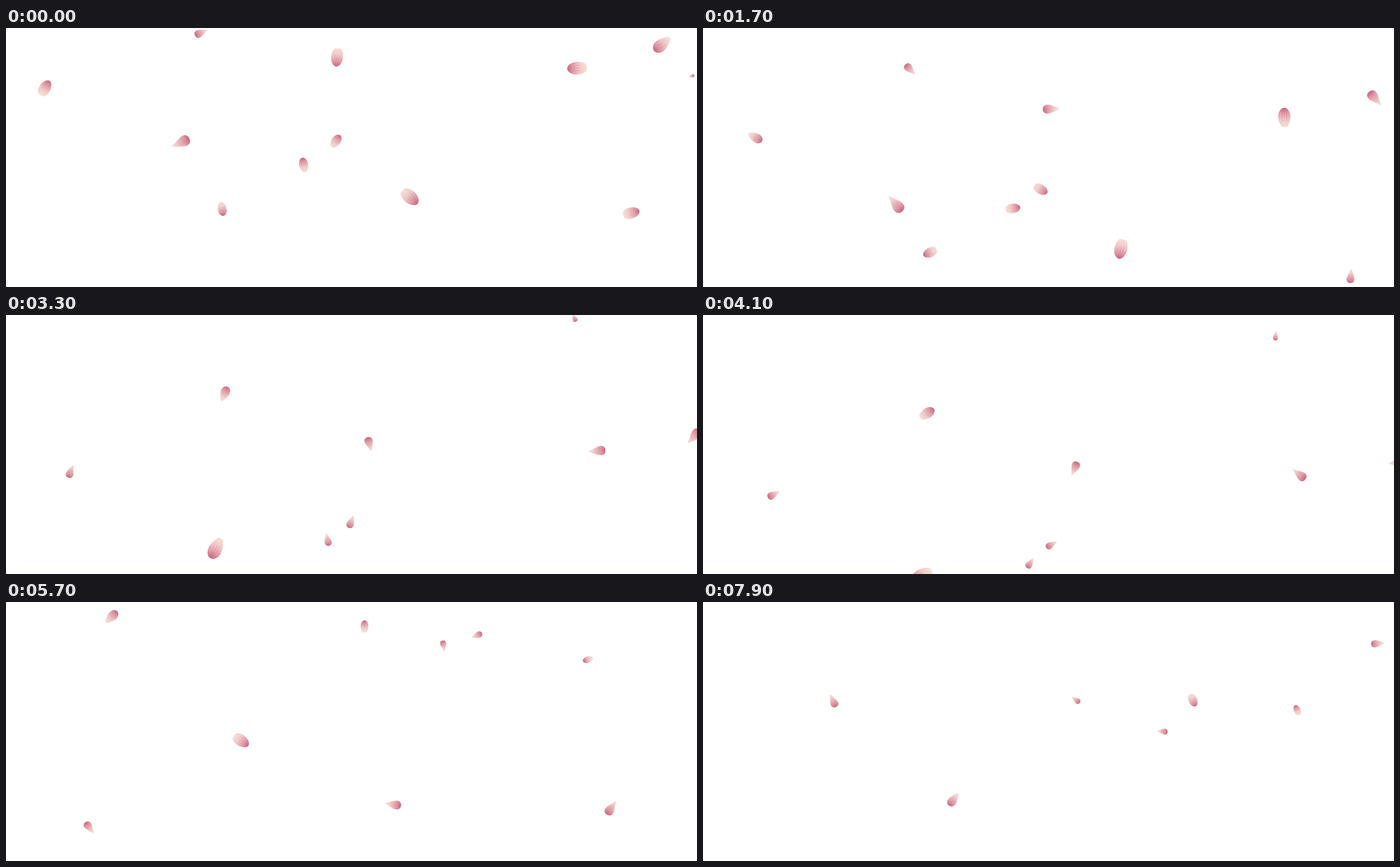
These frames come from a looping animation (1221 px wide and 458 px high, 8 s). An HTML page with a canvas:

```html
<!DOCTYPE html>
<html lang="en">
<head>
<meta charset="utf-8">
<title>Falling petals</title>
<style>
  html, body { margin: 0; width: 100%; height: 100%; overflow: hidden; background: #fff; }
  canvas { display: block; width: 1221px; height: 458px; }
</style>
</head>
<body>
<canvas id="stage" width="1221" height="458"></canvas>
<script>
const ctx = document.getElementById('stage').getContext('2d');
const LOOP = 8000, STEP = 100, RAD = Math.PI / 180;

// x, y, speed x, speed y, heading, spin, length, tilt phase, [fall acceleration]
const petals = [
  [69, 106, 13.8, 51.5, -57, 51, 30, -8],
  [345.5, 8, 12.3, 37.5, 155, 42, 31, -195, 0.72],
  [585, 52, 17.4, 53.7, 96, 48, 33, 25],
  [1009, 71, 10.7, 51.3, 177, 54, 36, -35],
  [1159, 29, 17, 56.5, 140, 52, 40, 70],
  [1211, 85, 8.5, 43, -10, 35, 13, 250],
  [308, 203, 19, 63.5, -25, 43, 43, 180],
  [583, 200, 8.1, 50.2, -55, 50, 27, -45],
  [526, 242, 12.8, 43.5, 260, 54, 27, -45, 1.05],
  [382, 320, 11.2, 45.3, 80, 44, 26, -45],
  [714, 299, 14.3, 54, 40, 37, 36, -25],
  [1105, 327, 23.3, 65.6, -15, 65, 30, 20],
  [971, -129, 10, 40.5, -63, 39, 19, -234],
  [75.5, -357.5, 19.5, 67.3, 30, 50, 31, -169],
  [568.5, -294, 11.4, 59.1, -61, 58, 22, -249],
  [674.5, -313, 17.3, 68.6, -14, 48, 24, -114],
  [744, -238.5, 15.4, 52.2, 110, 40, 24, -299],
  [1102, -259, 11.4, 42.1, 85, 57, 27, -282]
];

const blush = ctx.createLinearGradient(-0.5, 0, 0.5, 0);
[[0, '#f7dfd9'], [0.4, '#efc8c6'], [0.75, '#df97a4'], [1, '#c9687f']]
  .forEach(([at, color]) => blush.addColorStop(at, color));

// Unit petal with its dark base at +x; openness 0 is a teardrop, 1 a broad oval.
function drawPetal(open) {
  const tip = 0.2 * open;
  const wideX = 0.24 - 0.27 * open;
  const wideY = 0.27 + 0.06 * open;
  const shoulder = tip + 0.08 + 0.06 * open;
  const round = wideX + 0.17 + 0.1 * open;
  const base = 0.18 - 0.02 * open;

  ctx.beginPath();
  ctx.moveTo(-0.48, -tip);
  ctx.bezierCurveTo(-0.27, -shoulder, wideX - 0.18, -wideY, wideX, -wideY);
  ctx.bezierCurveTo(round, -wideY, 0.5, -base, 0.5, 0);
  ctx.bezierCurveTo(0.5, base, round, wideY, wideX, wideY);
  ctx.bezierCurveTo(wideX - 0.18, wideY, -0.27, shoulder, -0.48, tip);
  ctx.quadraticCurveTo(-0.53, 0, -0.48, -tip);
  ctx.fillStyle = blush;
  ctx.fill();

  ctx.lineWidth = 0.035;
  ctx.strokeStyle = 'rgba(196, 92, 118, 0.22)';
  for (const side of [-1, 0, 1]) {
    ctx.beginPath();
    ctx.moveTo(0.44, side * 0.03);
    ctx.quadraticCurveTo(0.15, side * 0.14, -0.15, side * (0.07 + 0.08 * open));
    ctx.stroke();
  }
}

function render(t) {
  ctx.clearRect(0, 0, 1221, 458);
  for (const [x, y, vx, vy, heading, spin, length, phase, fall = 0] of petals) {
    const tilt = (phase + spin * 0.85 * t) * RAD;
    const open = ((1 + Math.cos(tilt)) / 2) ** 2;
    const size = length * (0.82 + 0.18 * open);
    ctx.save();
    ctx.translate(x + vx * t, y + vy * t + fall * t * t);
    ctx.rotate((heading + spin * t) * RAD);
    ctx.scale(size, size);
    drawPetal(open);
    ctx.restore();
  }
}

const start = performance.now();
function frame() {
  const elapsed = (performance.now() - start) % LOOP;
  render(Math.floor(elapsed / STEP) * STEP / 1000);
  requestAnimationFrame(frame);
}
frame();
</script>
</body>
</html>
```
